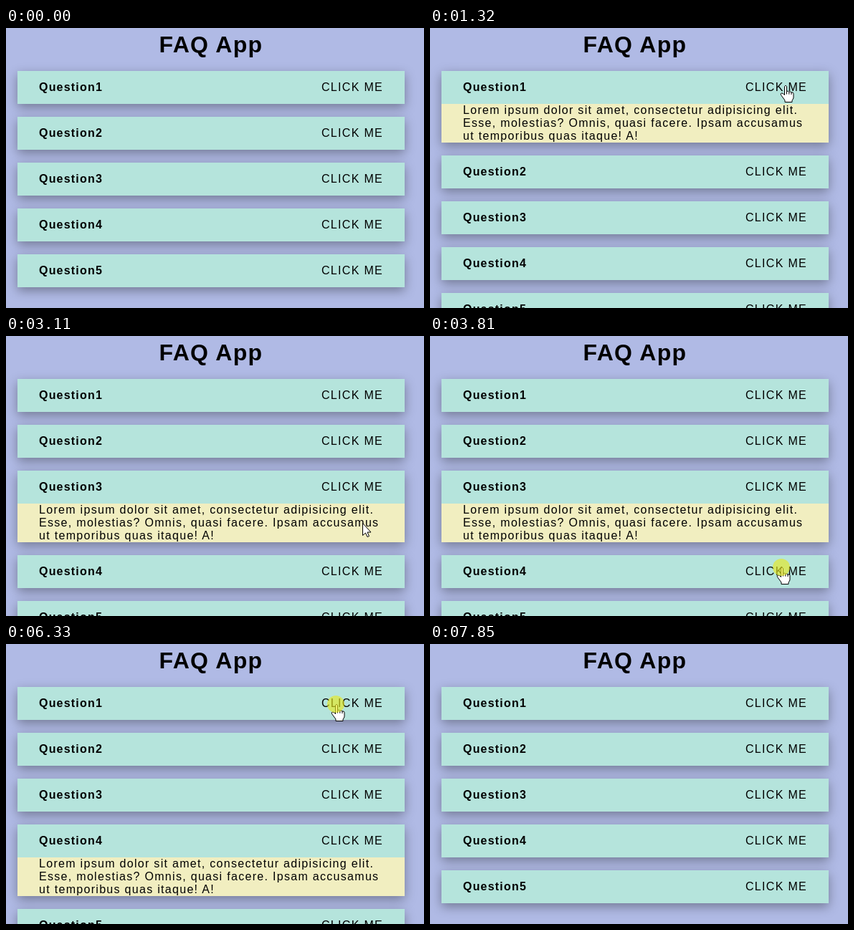
An HTML page that plays this animation: 583 px wide and 391 px high, repeating every 8.75 s.

```html
<!DOCTYPE html>
<html lang="en">
<head>
<meta charset="utf-8">
<title>FAQ App</title>
<style>
  html, body { margin: 0; width: 100%; height: 100%; overflow: hidden; }
  body {
    position: relative;
    background: #b0bae5;
    color: #000;
    font: 16px/18px Arial, "Liberation Sans", sans-serif;
    letter-spacing: 1.3px;
  }
  main { position: absolute; left: 16px; top: 5px; width: 540px; }
  h1 { margin: 0 0 18px; font-size: 32px; line-height: 37px; text-align: center; }
  section { margin-bottom: 18px; box-shadow: 0 5px 15px rgba(0, 0, 0, .35); }
  header {
    display: flex;
    justify-content: space-between;
    padding: 0 30px;
    line-height: 46px;
    background: #b5e4dc;
  }
  b { letter-spacing: 1.2px; }
  p { display: none; margin: 0; padding: 0 30px; white-space: nowrap; background: #f1eec0; }
  .open p { display: block; }
  svg { position: absolute; left: 0; top: 0; overflow: visible; }
  path { fill: #fff; stroke: #000; stroke-linejoin: round; }
</style>
</head>
<body>
<main><h1>FAQ App</h1></main>
<svg width="1" height="1">
  <g id="cursor">
    <path id="arrow" d="M.5 .5V17.5L4.5 14l2.5 5.5 2.5-1-2.5-5.5h5Z"/>
    <path id="hand" d="M-1.5 1.5q1.5-2.5 3 0V8.5q2.2-1 3.3 .7q2.2-1 3.2 .8q2.5-.8 3 1.5V17q0 2-2 4V23.5H-1V21L-6.5 13.5q-1-2 .8-2.5q2-.3 4.2 2.5ZM1.5 8.5v4M4.8 9.2v3.5M8 10v3"/>
    <circle id="glow" cx="-1" r="12" fill="#e6e822" opacity=".65"/>
  </g>
</svg>
<script>
const LOOP = 8750, STEP = 100, CLICK = 120;
const main = document.querySelector('main');
const [cursor, arrow, hand, glow] =
  ['cursor', 'arrow', 'hand', 'glow'].map(id => document.getElementById(id));

for (let i = 1; i <= 5; i++) {
  main.insertAdjacentHTML('beforeend', `<section>
    <header><b>Question${i}</b><span>CLICK ME</span></header>
    <p>Lorem ipsum dolor sit amet, consectetur adipisicing elit.<br>Esse, molestias? Omnis, quasi facere. Ipsam accusamus<br>ut temporibus quas itaque! A!</p>
  </section>`);
}
const cards = [...main.querySelectorAll('section')];

const moves = [], toggles = [];
const move = (at, steps, x, y) => moves.push({ at, steps, x, y });
const jump = (at, x, y) => move(at, 1, x, y);
const toggle = (at, card) => toggles.push({ at, card });

// Down the list, opening each card, then out at the bottom
jump(0, 500, 420);
jump(500, 507, 211);
move(600, 5, 496, 80);
toggle(1320, 0);
move(1520, 4, 498, 213);
toggle(2410, 1);
move(2510, 4, 497, 261);
toggle(3110, 2);
move(3210, 4, 491, 323);
toggle(3930, 3);
move(4030, 3, 489, 400);

// Back to the first card, then out at the left
jump(4730, 101, 181);
move(4830, 8, 176, 64);
move(5630, 6, 461, 84);
toggle(6430, 0);
move(6430, 3, -60, 64);
toggle(7650, -1);

const show = (el, on) => { el.style.display = on ? '' : 'none'; };

// Each move advances one equal step every STEP ms
function pointerAt(t) {
  const i = moves.findLastIndex(m => m.at <= t);
  const to = moves[i], from = moves[i - 1] || to;
  const k = Math.min((Math.floor((t - to.at) / STEP) + 1) / to.steps, 1);
  return ['x', 'y'].map(axis => Math.round(from[axis] + (to[axis] - from[axis]) * k));
}

function overHeader(y, open) {
  return cards.some((_, i) => {
    const top = 60 + 64 * i + (open >= 0 && i > open ? 54 : 0);
    return y >= top && y < top + 46;
  });
}

function draw(now) {
  const t = now % LOOP;
  const open = toggles.findLast(e => e.at <= t)?.card ?? -1;
  cards.forEach((card, i) => card.classList.toggle('open', i === open));

  const [x, y] = pointerAt(t);
  const onHeader = overHeader(y, open);
  cursor.setAttribute('transform', `translate(${x} ${y})`);
  show(hand, onHeader);
  show(arrow, !onHeader);
  show(glow, toggles.some(e => t >= e.at - CLICK && t < e.at));
  requestAnimationFrame(draw);
}
requestAnimationFrame(draw);
</script>
</body>
</html>
```
